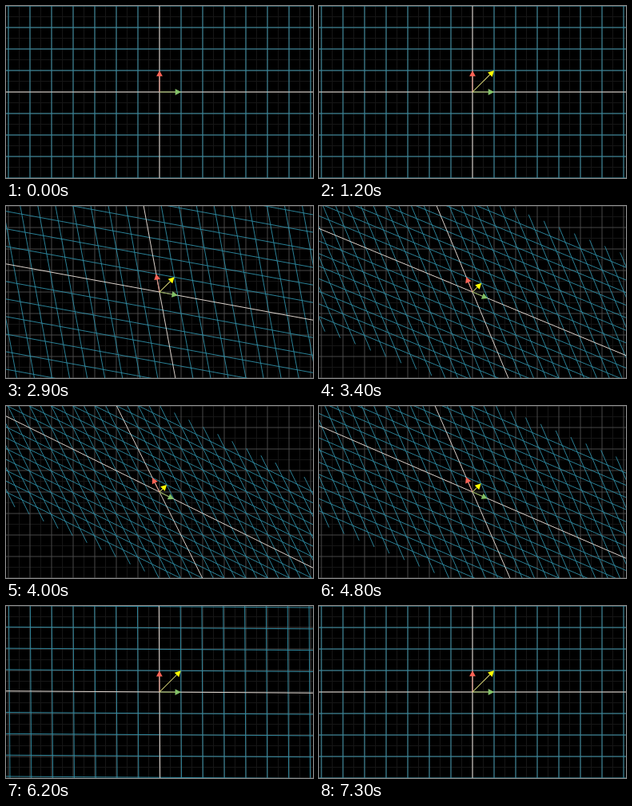
These frames come from a looping animation (384 px wide and 216 px high, 7.4 s). An HTML page with a canvas:

```html
<!DOCTYPE html>
<html lang="en">
<head>
<meta charset="utf-8">
<title>Linear transformation and its inverse</title>
<style>
html, body { margin: 0; width: 100%; height: 100%; overflow: hidden; background: #000; }
canvas { display: block; width: 384px; height: 216px; }
</style>
</head>
<body>
<canvas id="stage" width="384" height="216"></canvas>
<script>
const W = 384, H = 216, UNIT = 27, CX = W / 2, CY = H / 2;
const LOOP = 7400, STEP = 100;
const GROW = { start: 133, length: 800 };
const APPLY = { start: 1733, length: 2400 };
const UNDO = { start: 4133, length: 2400 };
const REACH_X = 14.22, REACH_Y = 8;
const GRID = '#2f8fa8', AXIS = '#dcd3cc';
const ctx = document.getElementById('stage').getContext('2d');

const sigmoid = x => 1 / (1 + Math.exp(-x));

// Sigmoid ease, rescaled to run exactly from 0 to 1
function progress(t, { start, length }) {
  const u = Math.min(1, Math.max(0, (t - start) / length));
  const low = sigmoid(-5);
  return (sigmoid(10 * (u - 0.5)) - low) / (1 - 2 * low);
}

// Blend of the identity and the inverse of [[2, 1], [1, 2]]
function mapping(s) {
  const a = 1 - s / 3, b = -s / 3;
  return (x, y) => [CX + UNIT * (a * x + b * y), CY - UNIT * (b * x + a * y)];
}

function line(p, q, color, width) {
  ctx.strokeStyle = color;
  ctx.lineWidth = width;
  ctx.beginPath();
  ctx.moveTo(...p);
  ctx.lineTo(...q);
  ctx.stroke();
}

function backdrop() {
  const at = mapping(0);
  for (const odd of [1, 0]) {
    const color = odd ? '#161616' : '#484848';
    for (let k = -16; k <= 16; k++) {
      if (Math.abs(k % 2) !== odd) continue;
      line(at(k / 2, -5), at(k / 2, 5), color, 1);
      line(at(-8, k / 2), at(8, k / 2), color, 1);
    }
  }
}

function plane(at) {
  const row = (y, color, w) => line(at(-REACH_X, y), at(REACH_X, y), color, w);
  const column = (x, color, w) => line(at(x, -REACH_Y), at(x, REACH_Y), color, w);
  for (let y = -7; y <= 7; y++) if (y) row(y, GRID, 0.9);
  for (let x = -14; x <= 14; x++) if (x) column(x, GRID, 0.9);
  row(0, AXIS, 1);
  column(0, AXIS, 1);
}

function arrow([x, y], color, stem, scale = 1) {
  const dx = x - CX, dy = y - CY;
  const len = Math.hypot(dx, dy), tip = 7.3;
  ctx.save();
  ctx.translate(CX, CY);
  ctx.rotate(Math.atan2(dy, dx));
  ctx.scale(scale, scale);
  line([0, 0], [len - tip, 0], stem, 1);
  ctx.fillStyle = color;
  ctx.beginPath();
  ctx.moveTo(len, 0);
  ctx.lineTo(len - tip, -3.9);
  ctx.lineTo(len - tip, 3.9);
  ctx.fill();
  ctx.restore();
}

function draw(t) {
  const at = mapping(progress(t, APPLY) - progress(t, UNDO));
  const grown = progress(t, GROW);
  ctx.fillStyle = '#000';
  ctx.fillRect(0, 0, W, H);
  backdrop();
  plane(at);
  arrow(at(1, 0), '#83c167', '#7c9a44');
  arrow(at(0, 1), '#fc6255', '#d88a7c');
  if (grown > 0) arrow(at(1, 1), '#ffff00', '#e8e480', grown);
}

const begin = performance.now();
function frame() {
  const t = (performance.now() - begin) % LOOP;
  draw(Math.floor(t / STEP) * STEP);
  requestAnimationFrame(frame);
}
frame();
</script>
</body>
</html>
```
